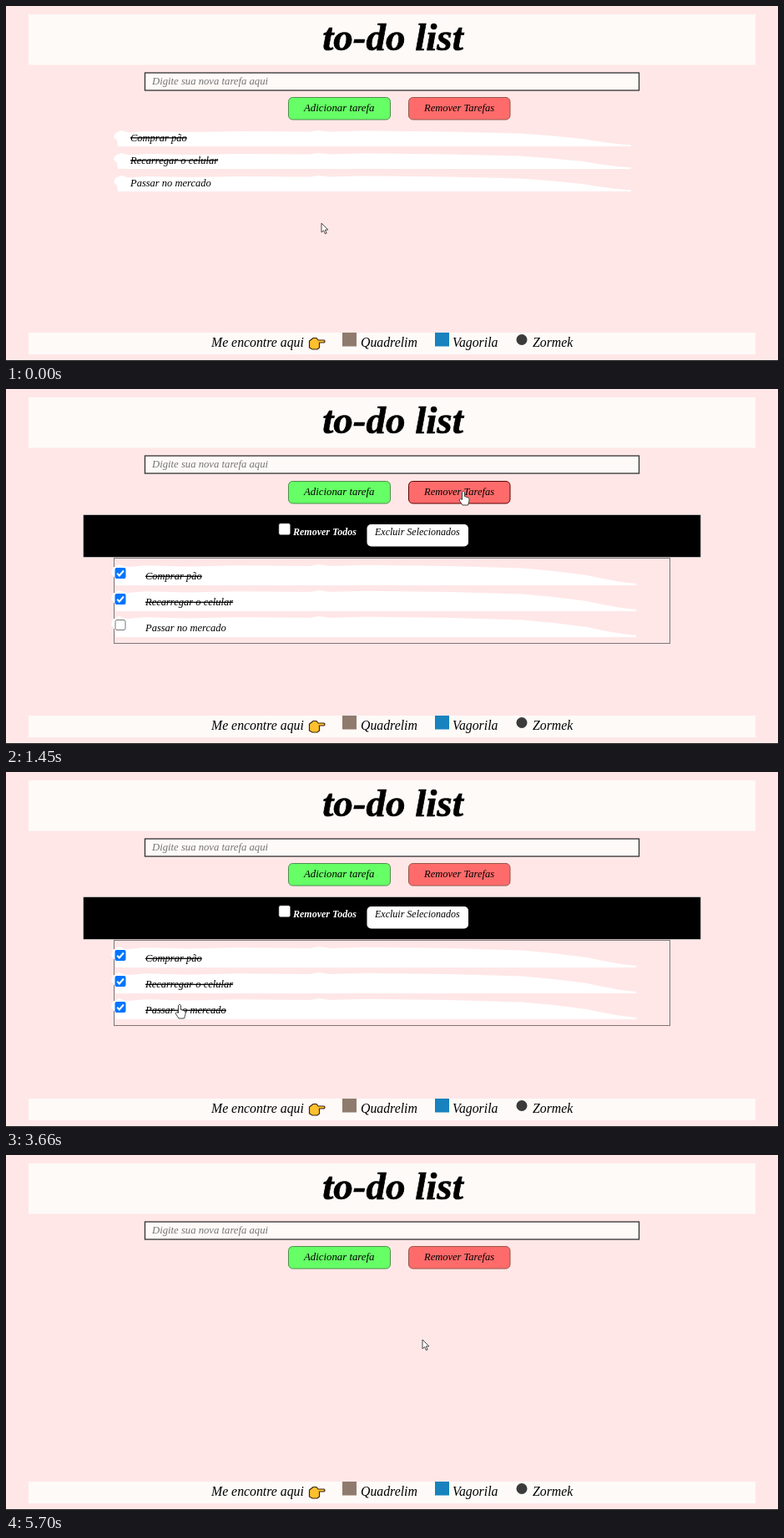
Write an HTML page that moves like this. It is 925x425 px and loops after 5.77 s.

```html
<!DOCTYPE html>
<html lang="pt">
<head>
<meta charset="utf-8">
<title>to-do list</title>
<style>
  html, body { margin: 0; width: 100%; height: 100%; overflow: hidden; background: #ffe7e7; }
  svg { display: block; font: italic 12.5px "Liberation Serif", serif; }
  .title { font-size: 47px; font-weight: bold; text-anchor: middle; stroke: #000; stroke-width: .7; }
  .footer { font-size: 15.8px; }
  .paper { fill: #fdfaf8; }
  .done { text-decoration: line-through; }
  .dots { fill: none; stroke-dasharray: 1 1; }
  .outline { fill: #fff; stroke: #333; stroke-width: .9; stroke-linejoin: round; }
</style>
</head>
<body>
<svg width="925" height="425" viewBox="0 0 925 425">
  <defs>
    <path id="brush" fill="#fff" d="M5 19 4 12 0 8 2 3 9 0 18 2.5 40 1 90 2 150 1 235 1.5 245 0 258 1.5 300 .5 400 1.5 485 3.5 520 6 562 10 580 13 602 16 620 17.5V19Z"/>
    <path id="arrow" class="outline" d="M0 0V11L2.6 8.7 4.4 12.7 6.1 12 4.4 8H7.8Z"/>
    <path id="hand" class="outline" d="M-1.5 1.5Q0-1 1.5 1.5V6.5L6 8Q7.5 9 7 12L5.5 17H-1L-5 11Q-4 8.5-1.5 10.5Z"/>
    <g id="checked">
      <rect width="13" height="13" rx="2" fill="#0075ff"/>
      <path d="M2.7 6.8 5.3 9.5 10.4 3.5" fill="none" stroke="#fff" stroke-width="2"/>
    </g>
    <rect id="unchecked" x=".5" y=".5" width="12" height="12" rx="2" fill="#fff" stroke="#777"/>
  </defs>

  <rect class="paper" x="27" y="10" width="871" height="60.5"/>
  <text class="title" x="463.5" y="53">to-do list</text>
  <rect class="paper" x="166.5" y="80" width="592" height="21" stroke="#333" stroke-width="1.3"/>
  <text x="175" y="94" fill="#757575" font-size="12.7">Digite sua nova tarefa aqui</text>

  <rect class="paper" x="27" y="391" width="871" height="26"/>
  <g class="footer">
    <text x="246" y="408">Me encontre aqui</text>
    <path d="M363.5 401 368 397.5H372L374 400H381Q383 401.500 381 403H375.500V409L373 411H367L363.500 409Z" fill="#ffc02e" stroke="#3a2413" stroke-width="1.2"/>
    <rect x="403" y="391" width="17" height="16.500" fill="#8f7b6d"/>
    <text x="425" y="408">Quadrelim</text>
    <rect x="514" y="391" width="17" height="16.500" fill="#1782bd"/>
    <text x="535" y="408">Vagorila</text>
    <circle cx="618" cy="399.500" r="6.500" fill="#3b3b3b"/>
    <text x="631" y="408">Zormek</text>
  </g>
  <rect y="424" width="925" height="1" fill="#222"/>

  <g id="app"></g>
  <circle id="click" r="8.500" fill="#ffe600" fill-opacity=".65"/>
  <use id="cursor"/>
</svg>

<script>
const LOOP = 5770;
const $ = id => document.getElementById(id);
const tasks = ["Comprar pão", "Recarregar o celular", "Passar no mercado"];

// Pointer path: time, x, y
const path = [
  [0, 378, 260], [160, 378, 260], [700, 550, 166], [790, 550, 164],
  [1100, 548, 122], [1680, 548, 122], [1980, 264, 217], [2210, 227, 270],
  [2290, 227, 270], [2850, 208, 260], [3160, 208, 260], [3400, 208, 278],
  [3810, 208, 278], [4360, 507, 148], [4580, 511, 132], [4800, 507, 172],
  [5400, 507, 172], [5700, 499, 221], [LOOP, 499, 221]
];
const clicks = [[1350, 1450], [2920, 3000], [3090, 3160], [3560, 3660], [4970, 5050]];

const within = (t, [from, to]) => t >= from && t < to;

function pointerAt(t) {
  const i = path.findIndex(p => p[0] > t);
  const [t0, x0, y0] = path[i - 1], [t1, x1, y1] = path[i];
  const k = (t - t0) / (t1 - t0);
  return [x0 + (x1 - x0) * k, y0 + (y1 - y0) * k];
}

const text = (x, y, label, attrs = "") => `<text x="${x}" y="${y}" ${attrs}>${label}</text>`;
const box = (x, y, w, h, attrs) => `<rect x="${x}" y="${y}" width="${w}" height="${h}" ${attrs}/>`;

function buttons(hover) {
  const y = 109.5 + hover;
  return box(338.5, y, 122, 26.5, 'rx="5" fill="#66ff66" stroke="#4b8f4b"') +
    box(482.5, y, 121.5, 26.5, `rx="5" fill="#ff6b6b" stroke="${hover ? "#5c0000" : "#95564a"}"`) +
    text(357, y + 16.5, "Adicionar tarefa", 'font-size="12.8"') +
    text(501, y + 16.5, "Remover Tarefas");
}

function plainList(shift) {
  return tasks.map((task, i) => {
    const y = 149 + shift + 27 * i;
    return `<use href="#brush" x="129" y="${y}"/>` +
      text(149, y + 12.5, task, i < 2 ? 'class="done"' : "");
  }).join("");
}

function removePanel(shift, hover, done) {
  const bar = `height="${51 - hover}"`;
  const rows = tasks.map((task, i) => {
    const y = 209 + Math.round(31.2 * i) - hover;
    return `<use href="#brush" transform="translate(126 ${y}) scale(1.015 1.31)"/>` +
      `<use href="#${done[i] ? "checked" : "unchecked"}" x="130.5" y="${y + 4}"/>` +
      text(167, y + 18, task, done[i] ? 'class="done"' : "");
  }).join("");
  return `<g transform="translate(0 ${shift})">
    <rect x="92.500" y="149.500" width="740" ${bar}/>
    <rect class="dots" x="92.500" y="149.500" width="740" ${bar} stroke="#fff"/>
    ${box(327, 160, 13.5, 13.5, 'rx="2" fill="#fff" stroke="#777" stroke-width=".6"')}
    ${text(344, 174, "Remover Todos", 'fill="#fff" font-weight="bold" font-size="12"')}
    ${box(432.5, 161, 121.500, 26.500, 'rx="5" fill="#fff"')}
    ${text(442, 174 + hover, "Excluir Selecionados", 'font-size="12"')}
    ${box(129.5, 201.5 - hover, 666, 102, 'class="dots" stroke="#000"')}
    ${rows}</g>`;
}

let shown = "";
function draw(t) {
  const [x, y] = pointerAt(t);
  const over = (x0, y0, x1, y1) => x >= x0 && x <= x1 && y >= y0 && y <= y1;
  const panel = within(t, [1450, 5050]);
  const onRemove = over(482, 109, 604, 137);
  const onDelete = panel && over(432, 161, 554, 188);
  const onLabel = panel && over(167, 240, 272, 296);
  const done = [true, !within(t, [3000, 3160]), t >= 3660];

  let scene = buttons(+onRemove);
  if (panel) scene += removePanel(+onRemove, +onDelete, done);
  else if (t < 1450) scene += plainList(+onRemove);
  if (scene !== shown) $("app").innerHTML = shown = scene;

  const place = `translate(${x} ${y})`;
  $("cursor").setAttribute("href", onRemove || onDelete || onLabel ? "#hand" : "#arrow");
  $("cursor").setAttribute("transform", place);
  $("click").setAttribute("transform", place);
  $("click").style.display = clicks.some(span => within(t, span)) ? "" : "none";
}

const start = performance.now();
function tick() {
  draw((performance.now() - start) % LOOP);
  requestAnimationFrame(tick);
}
tick();
</script>
</body>
</html>
```
